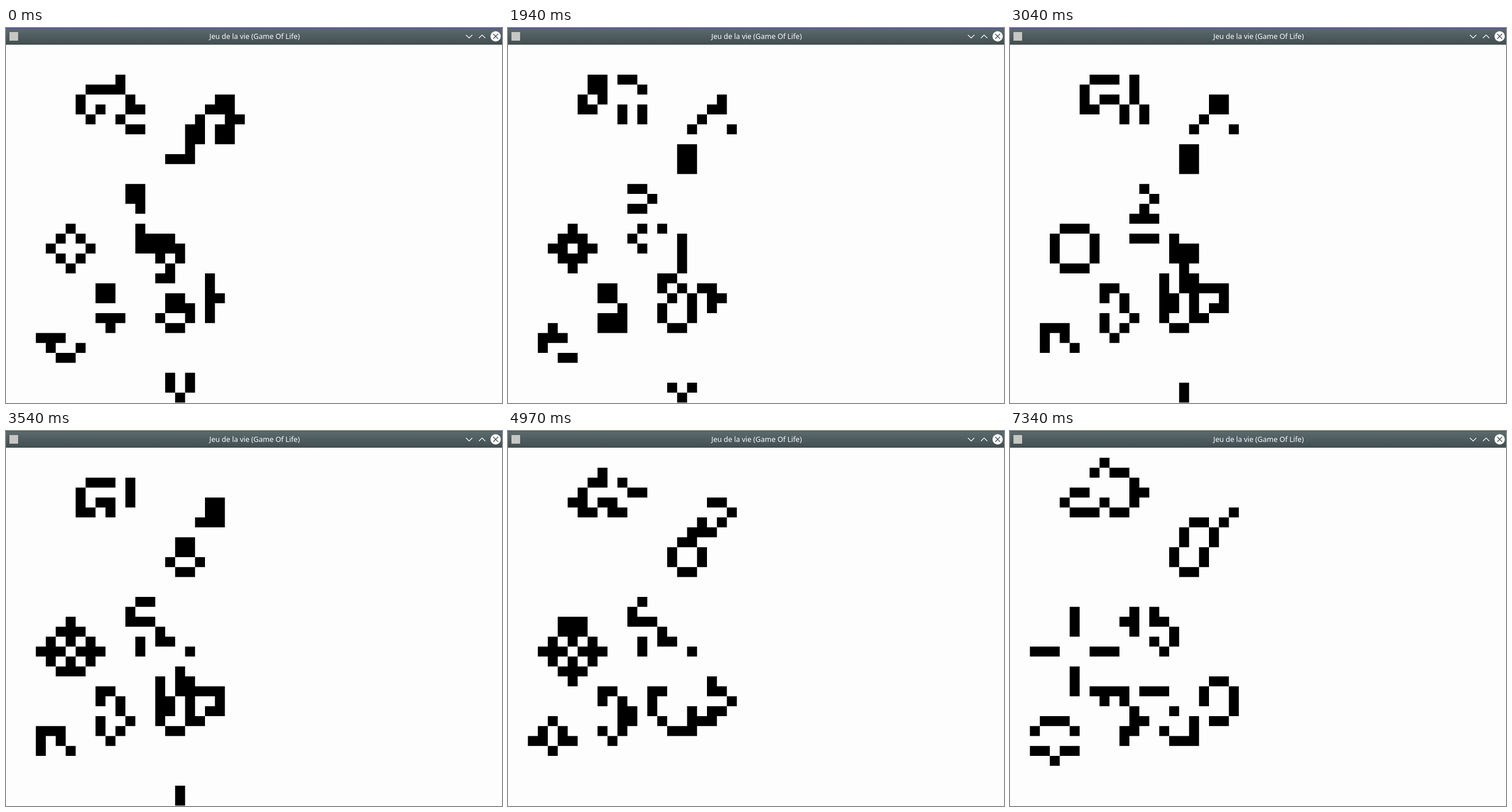
An HTML page with a canvas that plays this animation: 860 px wide and 651 px high, repeating every 7.37 s.

```html
<!DOCTYPE html>
<html lang="fr">
<head>
<meta charset="utf-8">
<title>Jeu de la vie</title>
<style>
html, body { margin: 0; width: 100%; height: 100%; overflow: hidden; background: #fdfdfd; }
canvas, svg { position: absolute; left: 0; top: 0; display: block; }
text { font: 12.5px "Noto Sans", "Open Sans", sans-serif; fill: #fcfcfc; }
</style>
</head>
<body>
<canvas id="board" width="860" height="651"></canvas>
<svg width="860" height="30" viewBox="0 0 860 30" fill="none">
  <defs>
    <linearGradient id="bar" x2="0" y2="1">
      <stop offset="0" stop-color="#5c6b70"/>
      <stop offset="1" stop-color="#414e50"/>
    </linearGradient>
  </defs>
  <rect width="860" height="29" fill="url(#bar)"/>
  <rect width="860" height="1" fill="#44479a"/>
  <rect x="6" y="7" width="15" height="15" fill="#c6c6c2"/>
  <text x="431" y="19" text-anchor="middle">Jeu de la vie (Game Of Life)</text>
  <path d="M797.5 12l5.5 5.5 5.5-5.5M820 17.5l5.5-5.5 5.5 5.5" stroke="#fcfcfc" stroke-width="1.2"/>
  <circle cx="849" cy="14.5" r="9" fill="#fcfcfc"/>
  <path d="M844.8 10.3l8.4 8.4m0-8.4l-8.4 8.4" stroke="#465356" stroke-width="1.3"/>
</svg>
<script>
const COLS = 50, ROWS = 36, CELL = 17.25, TOP = 29.25, LOOP = 7370;

// Each generation sweeps the board cell by cell from its start time.
const STARTS = [110, 1524, 2865, 4430, 6070, 7165];
const ROW_MS = 31;

const grid = Array.from({ length: ROWS }, () => new Array(COLS).fill(0));

// Life run-length notation: b dead, o alive, $ next row.
function plant(left, top, rle) {
  let row = top, col = left;
  for (const [, count, tag] of rle.matchAll(/(\d*)([bo$])/g)) {
    const n = +count || 1;
    if (tag === "$") { row += n; col = left; continue; }
    if (tag === "o") grid[row].fill(1, col, col + n);
    col += n;
  }
}

plant(7, 3, "4bo$b4o$o4bo$obo2b2o$bo2bo$5b2o");
plant(16, 5, "5b2o$4b3o$3bo2b2o$2b2ob2o$2b2ob2o$2bo$3o");
plant(12, 14, "2o$2o$bo");
plant(13, 18, "o$4o$5o$2bobo$3bo$2b2o");
plant(4, 18, "2bo$bobo$o3bo$bobo$2bo");
plant(9, 24, "2o$2o2$3o$bo");
plant(15, 25, "b2o$b3o$o2bo$b2o");
plant(20, 23, "o$o$2o$o$o");
plant(3, 29, "3o$bo2bo$2b2o");
plant(16, 33, "obo$obo$bo");

function evolve(cells) {
  const at = (r, c) => (cells[r] && cells[r][c]) || 0;
  return cells.map((line, r) => line.map((alive, c) => {
    let sum = -alive;
    for (let dr = -1; dr <= 1; dr++)
      for (let dc = -1; dc <= 1; dc++) sum += at(r + dr, c + dc);
    return +(sum === 3 || (alive && sum === 2));
  }));
}

const generations = [grid];
for (const _ of STARTS) generations.push(evolve(generations.at(-1)));

const ctx = document.getElementById("board").getContext("2d");

function draw(t) {
  ctx.fillStyle = "#fdfdfd";
  ctx.fillRect(0, 0, 860, 651);
  ctx.fillStyle = "#000";
  ctx.beginPath();
  for (let r = 0; r < ROWS; r++)
    for (let c = 0; c < COLS; c++) {
      const delay = ROW_MS * (r + c / COLS);
      const age = STARTS.filter(start => t >= start + delay).length;
      if (generations[age][r][c]) ctx.rect(c * CELL, TOP + r * CELL, CELL, CELL);
    }
  ctx.fill();
}

const begin = performance.now();
function tick() {
  draw((performance.now() - begin) % LOOP);
  requestAnimationFrame(tick);
}
tick();
</script>
</body>
</html>
```
